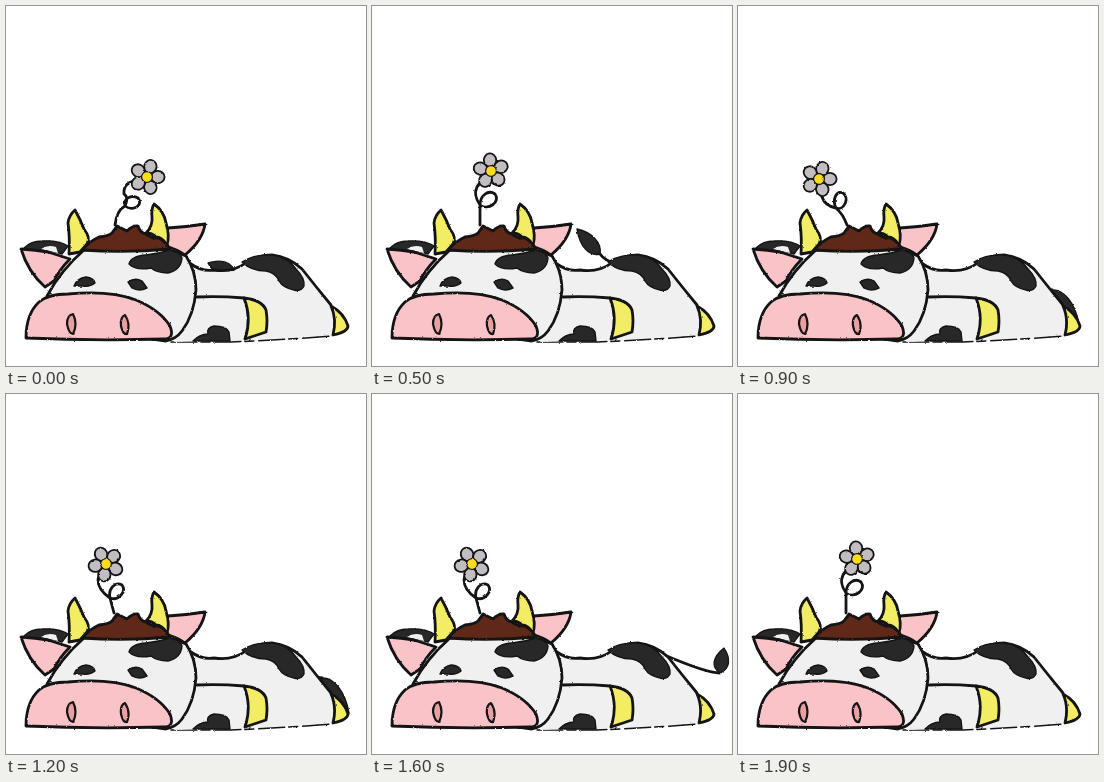
Write an HTML page that moves like this. It is 360 by 360 pixels and loops after 2.2 s.

```html
<!DOCTYPE html>
<html lang="en">
<head>
<meta charset="utf-8">
<title>Resting cow</title>
<style>
html, body { margin: 0; width: 100%; height: 100%; overflow: hidden; background: #fff; }
svg { display: block; width: 100vw; height: 100vh; }
.ink { fill: none; stroke: #141414; stroke-width: 2.8; stroke-linecap: round; stroke-linejoin: round; }
.skin { fill: #f0f0f0; }
.pink { fill: #f9c3c7; }
.gold { fill: #f3ed65; }
.soil { fill: #5f2819; }
.dark { fill: #282828; stroke-width: 1.4; }
.thin { stroke-width: 1.5; }
.petal { fill: #c2bdc2; stroke-width: 1.8; }
</style>
</head>
<body>
<svg viewBox="0 0 360 360">
  <defs>
    <filter id="rough" filterUnits="userSpaceOnUse" x="0" y="0" width="360" height="360" color-interpolation-filters="sRGB">
      <feTurbulence type="fractalNoise" baseFrequency=".3" numOctaves="2" seed="4"/>
      <feDisplacementMap in="SourceGraphic" scale="2" xChannelSelector="R" yChannelSelector="G"/>
    </filter>
  </defs>
  <g id="tail" filter="url(#rough)">
    <path id="tailStem" class="ink"/>
    <path id="leaf" class="ink dark" d="M0 0C5-10 18-11 33 0C21 9 7 10 0 0Z"/>
  </g>
  <g id="flower" filter="url(#rough)">
    <path id="stem" class="ink"/>
    <g id="bloom"></g>
  </g>
  <g filter="url(#rough)">
    <!-- body and hind hoof -->
    <path class="skin" d="M185 259Q202 267 228 265Q246 249 266 249Q283 251 296 263L325 299L342 321L327 330L225 336L170 336Z"/>
    <path class="ink" d="M185 258Q196 266 208 264Q227 267 241 256Q253 249 266 249Q283 251 296 263Q311 282 325 299"/>
    <path class="ink thin" d="M165 336L225 336Q275 334 326 330" stroke-dasharray="26 4 9 5"/>
    <path class="ink dark" d="M236 256Q248 248 266 249Q282 251 290 263Q299 272 298 280Q295 286 288 284Q277 282 273 275Q270 267 260 265Q245 265 236 256Z"/>
    <path class="ink gold" d="M325 300Q338 307 342 320Q342 326 327 329Q331 313 325 300Z"/>
    <!-- front leg -->
    <path class="skin" d="M188 291L238 292Q264 296 260 326L239 334L168 336Z"/>
    <path class="ink dark" d="M187 335Q194 328 202 328Q200 322 208 320Q220 320 223 326L224 335Z"/>
    <path class="ink gold" d="M238 292Q256 294 260 304Q262 315 260 326L239 333Q246 312 238 292Z"/>
    <path class="ink" d="M191 291Q214 290 238 292"/>
    <!-- ears -->
    <path class="ink dark" d="M18 242Q25 235 36 235Q53 234 62 240L56 248Q40 243 33 246Z"/>
    <path class="skin" d="M35 243Q42 238 50 241L52 247Z"/>
    <path class="ink pink" d="M15 243Q30 244 42 246L64 253Q53 264 48 275L39 281Q22 266 15 243Z"/>
    <path class="ink pink" d="M162 222Q180 221 199 218Q197 234 179 249Q171 243 159 240Z"/>
    <!-- head -->
    <path class="ink skin" d="M41 290Q55 264 78 244Q100 242 120 244Q161 240 180 250Q190 265 190 284Q188 309 176 325Q170 333 160 335L55 320Z"/>
    <path class="ink dark" d="M123 258Q125 250 140 249Q152 248 164 244Q174 246 176 252Q175 264 162 267Q151 267 145 262Q130 265 123 258Z"/>
    <path class="ink soil" d="M76 244Q84 235 93 231Q103 230 106 227L111 220L121 225Q127 219 132 220Q134 227 140 228Q147 233 153 232Q160 236 164 243Q120 247 76 244Z"/>
    <path class="ink gold" d="M69 204Q74 213 78 223Q85 232 81 238L74 246L63 248Q64 231 62 217Q63 209 69 204Z"/>
    <path class="ink gold" d="M148 198Q158 205 160 217Q164 230 161 239Q156 231 150 231Q146 227 140 227Q147 220 146 211Q145 203 148 198Z"/>
    <path class="ink dark" d="M68 280Q71 272 80 271Q88 272 89 277Q84 281 77 280Z"/>
    <path class="ink dark" d="M122 276Q129 271 136 275L141 282Q133 286 126 282Z"/>
    <path class="ink pink" d="M20 332Q20 308 33 296Q42 288 62 288Q104 284 130 294Q154 304 164 320Q169 333 158 333Q87 335 20 332Z"/>
    <g class="ink" style="fill:#e8a0a3;stroke-width:2.2">
      <path d="M67 308Q61 309 61 318Q63 328 67 328Q72 318 67 308Z"/>
      <path d="M119 309Q114 311 115 320Q117 329 121 328Q125 318 119 309Z"/>
    </g>
  </g>
</svg>
<script>
const el = id => document.getElementById(id);
const set = (id, name, value) => el(id).setAttribute(name, value);

let petals = "";
for (let a = -95; a < 265; a += 72)
  petals += `<ellipse class="ink petal" cx="10.8" rx="6.8" ry="6.2" transform="rotate(${a})"/>`;
el("bloom").innerHTML = petals + '<circle class="ink" r="5.4" style="fill:#f9dc1c;stroke-width:1.2"/>';

// Flower sways through four poses: x, y, turn, stem
const poses = [
  [141, 171, 23, "M109 219Q111 204 119 200C127 206 138 199 132 192C125 188 117 193 119 200Q123 191 118 188Q117 176 131 175"],
  [119, 165, 0, "M108 219L108 199C116 205 129 196 123 188C116 183 108 190 108 199Q101 189 105 181Q107 177 112 174"],
  [100, 170, -22, "M108 219L104 204C112 207 121 198 116 191C109 187 102 195 104 204Q92 196 92 186Q92 181 97 179"],
  [81, 173, -49, "M109 219Q105 208 98 202C106 205 112 192 105 187C98 184 94 194 98 202Q87 200 84 191L82 186"]
];

// Tail per step: root of the stem, then leaf base and tip
const left = [246, 259], right = [290, 260];
const tails = [
  [left, 229, 267, 202, 257],
  [left, 214, 268, 203, 241],
  [left, 227, 250, 204, 225],
  [left, 231, 242, 211, 213],
  [left, 231, 242, 211, 215],
  [left, 228, 248, 205, 223],
  [left, 222, 257, 203, 233],
  [left, 210, 269, 203, 242],
  null,
  [right, 314, 284, 341, 318],
  [right, 316, 284, 343, 319],
  [right, 315, 280, 346, 306],
  [right, 314, 276, 349, 297],
  [right, 332, 278, 359, 286],
  [right, 348, 279, 352, 254],
  [right, 336, 279, 358, 268],
  [right, 315, 284, 342, 318],
  null
];

function draw(i) {
  const [x, y, turn, stem] = poses[3 - Math.abs(i % 6 - 3)];
  set("stem", "d", stem);
  set("bloom", "transform", `translate(${x} ${y}) rotate(${turn})`);

  const tail = tails[i];
  set("tail", "visibility", tail ? "visible" : "hidden");
  if (!tail) return;
  const [[rx, ry], bx, by, tx, ty] = tail;
  const dx = tx - bx, dy = ty - by;
  const bend = rx < bx ? `C${rx + 14} ${ry + 6} ${bx - 12} ${by}` : `Q${bx + 4} ${by + 6}`;
  set("tailStem", "d", `M${rx} ${ry}${bend} ${bx} ${by}`);
  set("leaf", "transform",
    `translate(${bx} ${by}) rotate(${Math.atan2(dy, dx) * 180 / Math.PI}) scale(${Math.hypot(dx, dy) / 33} .95)`);
}

let last = -1;
function tick(now) {
  const n = Math.floor(now % 2200 / 100);
  // Steps 9 and 17 are held for 300 ms
  const i = n < 9 ? n : Math.min(Math.max(n - 2, 9), 17);
  if (i !== last) draw(last = i);
  requestAnimationFrame(tick);
}
tick(performance.now());
</script>
</body>
</html>
```
